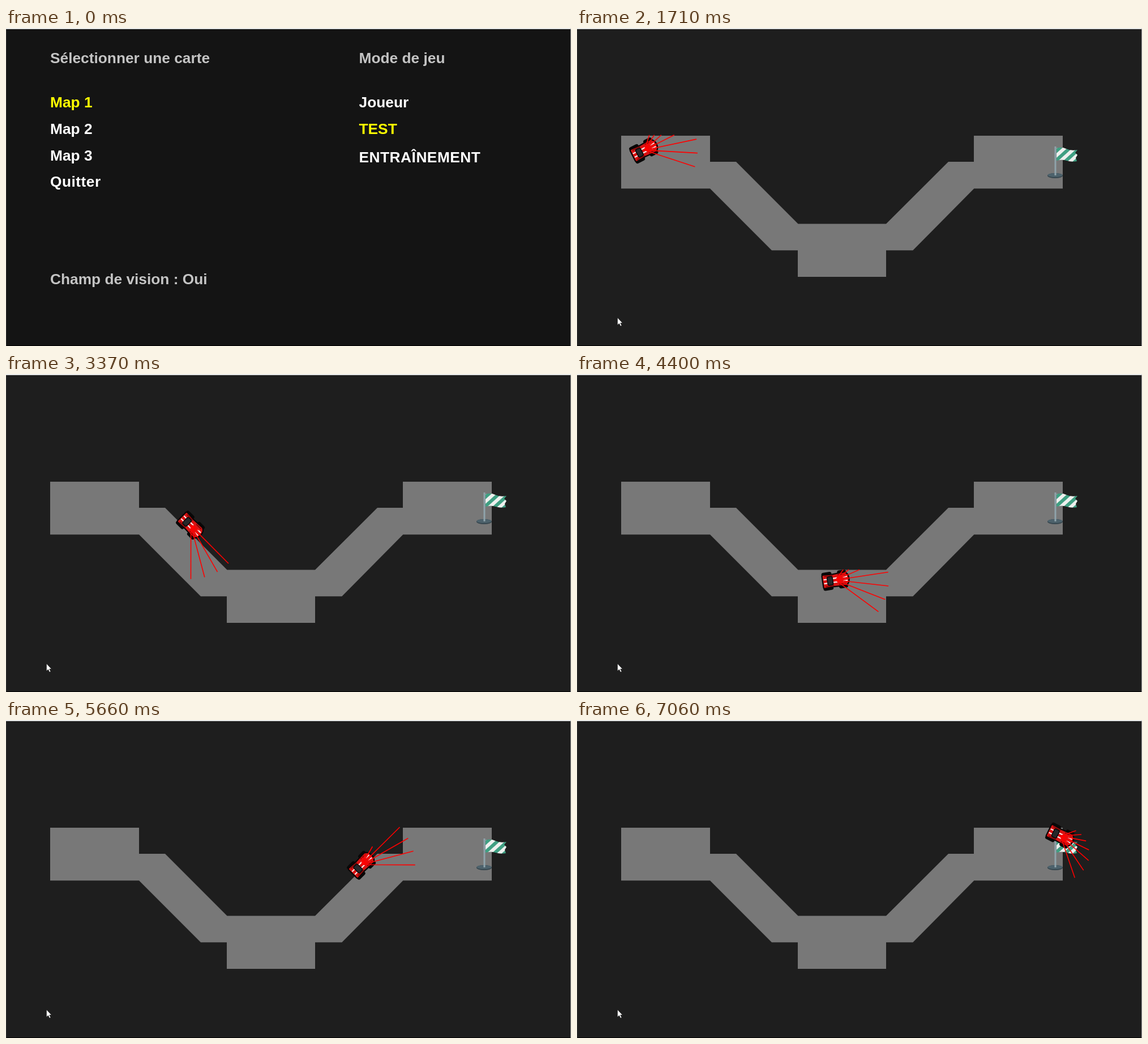
These frames come from a looping animation (998x561 px, 7.13 s). An HTML page:

```html
<!DOCTYPE html>
<html lang="fr">
<head>
<meta charset="utf-8">
<style>
  html, body { margin: 0; width: 100%; height: 100%; overflow: hidden; background: #141414; }
  svg { display: block; width: 998px; height: 561px; }
  text { font: bold 26.3px "Liberation Sans", Arial, sans-serif; font-kerning: none; fill: #fff; }
  .label { fill: #c4c4c4; }
  .active { fill: #ff0; }
  .wide { letter-spacing: .5px; }
</style>
</head>
<body>
<svg viewBox="0 0 998 561">
  <defs>
    <pattern id="stripes" width="12" height="12" patternUnits="userSpaceOnUse" patternTransform="translate(849 211) rotate(48)">
      <rect width="12" height="12" fill="#eef0ee"/>
      <rect width="6" height="12" fill="#3f9f82"/>
    </pattern>
  </defs>

  <g id="menu">
    <rect width="998" height="561" fill="#141414"/>
    <text class="label" x="78" y="62">Sélectionner une carte</text>
    <text class="active" x="78" y="140">Map 1</text>
    <text x="78" y="187">Map 2</text>
    <text x="78" y="233.5">Map 3</text>
    <text class="wide" x="78" y="280">Quitter</text>
    <text class="label" x="78" y="452">Champ de vision : Oui</text>
    <text class="label" x="623.5" y="62">Mode de jeu</text>
    <text x="623.5" y="140">Joueur</text>
    <text class="active" x="623.5" y="187">TEST</text>
    <text class="wide" x="623.5" y="237">ENTRAÎNEMENT</text>
  </g>

  <g id="game">
    <rect width="998" height="561" fill="#1e1e1e"/>
    <path fill="#787878" d="M78 190H235V236H281L390.5 345.5H546L656 236H701V190H858V283.3H701.3L593.3 392.3H546V439H390V392.3H344L235 283.3H78Z"/>
    <g id="flag">
      <ellipse cx="844.5" cy="260.5" rx="13.5" ry="4.5" fill="#37474f"/>
      <ellipse cx="844.5" cy="259.5" rx="13" ry="3.5" fill="#4d626c"/>
      <path d="M845 209V260" stroke="#8fa3ab" stroke-width="3"/>
      <path fill="url(#stripes)" d="M847 212Q856 209 864 213T884 215L880 220L884 224L881 229L883 235Q874 237 865 234T847 234Z"/>
    </g>
    <path d="M71.5 511V524L74.5 521.3L76.8 526L79 525L76.7 520.5H80.5Z" fill="#fff" stroke="#111" stroke-width=".6"/>
    <g id="car">
      <path d="M-20 -12.5H-9M8 -12.5H17M-20 12.5H-9M8 12.5H17" stroke="#080808" stroke-width="7" stroke-linecap="round"/>
      <path d="M-23 -10Q-23 -12 -20 -12L-4 -11L17 -12Q24 -9 24 0T17 12L-4 11L-20 12Q-23 12 -23 10Z" fill="#da1212" stroke="#0a0505" stroke-width="2.2"/>
      <path d="M-19 -9H-4M-19 9H-4M5 -8.5H17M5 8.5H17" stroke="#7c0909" stroke-width="1.8"/>
      <path d="M-21 -3.5H-14M-21 3.5H-14M-5 -3.5H3M-5 3.5H3M13 -3.5H21M13 3.5H21" stroke="#f4e6e6" stroke-width="2.2"/>
      <rect x="-14.5" y="-7.5" width="9.5" height="15" rx="2.5" fill="#25272a" stroke="#080808" stroke-width="1.5"/>
    </g>
    <path id="rays" fill="none" stroke="#f00" stroke-width="1.6"/>
  </g>

  <path d="M0 1H998" stroke="#e9ebea" stroke-width="2"/>
  <path d="M0 560.5H998" stroke="#000"/>
  <path d="M.5 2V561" stroke="#333"/>
  <path d="M997.6 0V561" stroke="#ccc" stroke-width=".8"/>
</svg>
<script>
const LOOP = 7130, START = 530, STEP = 69.4;
const DEPART = 640, ARRIVE = 7060, ACCELERATION = 8.1e-5, TOP_SPEED = .17;
const REACH = 94, HALF_WIDTH = 46.8;
const ROAD = [[78, 236], [235, 236], [390, 392], [546, 392], [701, 236], [858, 236]];

// Bends of the drive: time, x, y, heading in degrees
const BENDS = [
  [DEPART, 78, 236, -27], [1990, 143.5, 203, -27], [2410, 194, 194, 0],
  [3370, 326, 267, 45], [4050, 398, 345, 45], [4400, 454, 364, -9], [5030, 551, 332, -45],
  [5800, 645, 239, -45], [6570, 770, 194, 0], [ARRIVE, 855, 205, 27]
];

const $ = id => document.getElementById(id);
const radians = degrees => degrees * Math.PI / 180;

function velocity([t, , , heading]) {
  const speed = Math.min(TOP_SPEED, ACCELERATION * (t - DEPART));
  return [speed * Math.cos(radians(heading)), speed * Math.sin(radians(heading))];
}

// Hermite curve from one bend to the next
function position(a, b, t) {
  const d = b[0] - a[0], u = (t - a[0]) / d, v = 1 - u;
  const va = velocity(a), vb = velocity(b);
  return [0, 1].map(i => v * v * (1 + 2 * u) * a[i + 1] + u * u * (3 - 2 * u) * b[i + 1]
    + d * u * v * (v * va[i] - u * vb[i]));
}

// The car points along its path
function pose(time) {
  const t = Math.max(DEPART + 20, Math.min(ARRIVE, time));
  const next = BENDS.findIndex(bend => bend[0] >= t);
  const at = s => position(BENDS[next - 1], BENDS[next], s);
  const [x, y] = at(t), [x0, y0] = at(t - 1), [x1, y1] = at(t + 1);
  return [x, y, Math.atan2(y1 - y0, x1 - x0) * 180 / Math.PI];
}

function onRoad(x, y) {
  return ROAD.slice(1).some(([bx, by], i) => {
    const [ax, ay] = ROAD[i], dx = bx - ax, dy = by - ay;
    const u = Math.max(0, Math.min(1, ((x - ax) * dx + (y - ay) * dy) / (dx * dx + dy * dy)));
    return Math.hypot(x - ax - u * dx, y - ay - u * dy) < HALF_WIDTH;
  });
}

function ray(x, y, degrees) {
  const c = Math.cos(radians(degrees)), s = Math.sin(radians(degrees));
  let r = 0;
  while (r < REACH && onRoad(x + r * c, y + r * s)) r++;
  return `M${x} ${y}L${x + r * c} ${y + r * s}`;
}

function draw(t) {
  const playing = t >= START;
  $('menu').style.display = playing ? 'none' : '';
  $('game').style.display = playing ? '' : 'none';
  if (!playing) return;
  const step = Math.floor((t - START + 20) / STEP);
  const [x, y, heading] = pose(START + step * STEP);
  $('car').setAttribute('transform', `translate(${x} ${y}) rotate(${heading})`);
  let d = '';
  for (let a = -45; a <= 45; a += 15) d += ray(x, y, heading + a);
  $('rays').setAttribute('d', d);
}

const begin = performance.now();
function tick() {
  draw((performance.now() - begin) % LOOP);
  requestAnimationFrame(tick);
}
tick();
</script>
</body>
</html>
```
